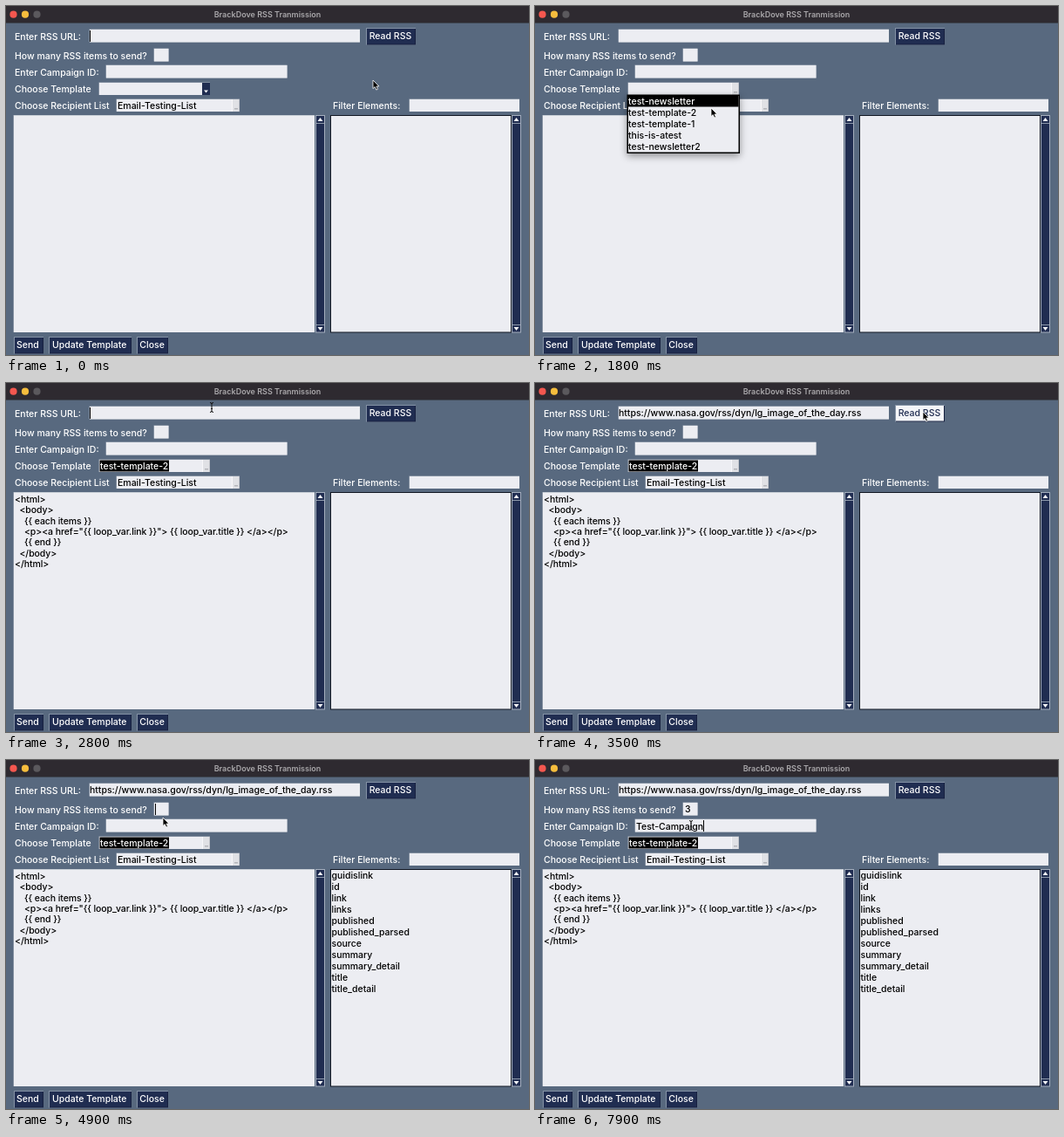
An HTML page for the animation above (8 s loop, 600x400 px).

```html
<!DOCTYPE html>
<html lang="en">
<head>
<meta charset="utf-8">
<title>RSS Tranmission</title>
<style>
  html, body { margin: 0; width: 100%; height: 100%; overflow: hidden; background: #58697f; }
  svg { display: block; width: 600px; height: 400px; }
  text { font: 500 10.5px Inter, Roboto, sans-serif; white-space: pre; fill: #000; }
  .light { fill: #fff; }
  .code { letter-spacing: -.08px; }
  .title { font-size: 9px; font-weight: 600; fill: #aaa8ab; text-anchor: middle; }
  .navy { fill: #202d51; }
  .shadow { filter: drop-shadow(0 3px 4px rgba(0, 0, 0, .4)); }
</style>
</head>
<body>
<svg id="stage" viewBox="0 0 600 400"></svg>
<script>
const LOOP = 8000, STEP = 100;
const NAVY = '#202d51', PALE = '#ecedf2';
const stage = document.getElementById('stage');

function add(tag, attrs, parent = stage) {
  const node = document.createElementNS('http://www.w3.org/2000/svg', tag);
  for (const key in attrs) node.setAttribute(key, attrs[key]);
  parent.appendChild(node);
  return node;
}
const group = (parent, cls = '') => add('g', { class: cls }, parent);
const rect = (x, y, width, height, fill, parent) => add('rect', { x, y, width, height, fill }, parent);
const path = (d, fill, parent) => add('path', { d, fill }, parent);
function label(x, y, string, cls = '', parent) {
  const node = add('text', { x, y, class: cls }, parent);
  node.textContent = string;
  return node;
}
function show(node, on) { node.style.display = on ? '' : 'none'; }

function field(x, y, w, h) {
  rect(x - .5, y - .5, w + .5, h + .5, '#a8b1be');
  rect(x, y, w, h, PALE);
}
function button(x, y, w, h, textX, string) {
  rect(x, y, w, h, '#8492a5');
  rect(x + 1, y + 1, w - 1, h - 1, '#172140');
  const face = rect(x + 1, y + 1, w - 2, h - 2, NAVY);
  const caption = label(textX, y + 13.3, string, 'light');
  return { face, caption };
}
function scrollbar(x) {
  rect(x, 125, 11, 249.5, '#a4aebd');
  rect(x + 1, 126, 9, 247.5, NAVY);
  rect(x + 1, 134, 9, 1, '#8d99ab');
  rect(x + 1, 365, 9, 1, '#8d99ab');
  path(`M${x + 2.5} 132h6l-3-4z M${x + 2.5} 368h6l-3 4z`, '#f2f3f6');
}
function paleArrow(x, y, parent) {
  rect(x, y, 9, 14, '#e0e1e5', parent);
  rect(x, y, 1, 14, '#f8f8fa', parent);
  rect(x + 8, y, 1, 14, '#c4c6cc', parent);
  rect(x + 3, y + 10, 4, 1.5, '#b4b5ba', parent);
}

// Window
rect(0, 0, 600, 400, '#58697f');
rect(0, 0, 600, 19.5, '#2e2a30');
rect(0, 19, 600, 1, '#3f4753');
[['#f4574f', 8.5], ['#f6bd3d', 22], ['#5b595d', 35.5]].forEach(([fill, cx]) =>
  add('circle', { cx, cy: 9.7, r: 4.1, fill }));
label(300, 13, 'BrackDove RSS Tranmission', 'title');

// Form
label(10, 38.5, 'Enter RSS URL:', 'light');
label(10, 60.5, 'How many RSS items to send?', 'light');
label(10, 80, 'Enter Campaign ID:', 'light');
label(10, 99, 'Choose Template', 'light');
label(10, 118.3, 'Choose Recipient List', 'light');
label(375, 118.3, 'Filter Elements:', 'light');
field(96, 27, 310, 14.5);
field(170, 49, 16.5, 14.5);
field(115, 68, 207.5, 14.5);
field(107, 88, 127, 14);
field(127, 107, 141, 14);
field(463, 107, 126, 14);
const navyArrow = group();
rect(225, 88, 9, 14, NAVY, navyArrow);
path('M227 96.5h5l-2.5 3z', '#f2f3f6', navyArrow);
const openedArrow = group();
paleArrow(225, 88, openedArrow);
paleArrow(259, 107);
label(128, 118, 'Email-Testing-List');
const read = button(413, 25, 57, 19.5, 416.7, 'Read RSS');
button(9, 379, 34, 19.5, 12, 'Send');
button(49, 379, 95, 19.5, 53, 'Update Template');
button(150, 379, 36, 19.5, 153.3, 'Close');

// Panels
field(9, 125.5, 345, 248.5);
rect(372, 125, 208, 249.5, '#111722');
rect(373, 126, 206, 247.5, PALE);
scrollbar(355);
scrollbar(580);

const chosen = group();
rect(107.5, 88.5, 79.5, 13, '#000', chosen);
label(108, 99, 'test-template-2', 'light', chosen);
[
  '<html>', '  <body>', '    {{ each items }}',
  '    <p><a href="{{ loop_var.link }}"> {{ loop_var.title }} </a></p>',
  '    {{ end }}', '  </body>', '</html>'
].forEach((line, i) => label(10, 136.8 + i * 12.35, line, 'code', chosen));

const elements = group();
['guidislink', 'id', 'link', 'links', 'published', 'published_parsed', 'source',
 'summary', 'summary_detail', 'title', 'title_detail']
  .forEach((name, i) => label(373.5, 136.2 + i * 13, name, '', elements));

// Template popup
const popup = group(stage, 'shadow');
rect(105.5, 101.5, 129.5, 67.5, '#000', popup);
rect(107, 103, 126.5, 64.5, PALE, popup);
const highlight = rect(107, 102.5, 126.5, 13, '#000', popup);
const options = ['test-newsletter', 'test-template-2', 'test-template-1', 'this-is-atest', 'test-newsletter2']
  .map((name, i) => label(107, 113 + i * 13, name, '', popup));

// Typed text, caret and pointer
const inputs = {
  url: { x: 96, y: 28, node: label(96, 38.3, '') },
  count: { x: 171, y: 50, node: label(172, 60.3, '') },
  campaign: { x: 116, y: 69, node: label(116, 79.5, '') }
};
const caret = rect(0, 0, 1, 13, '#000');
const arrow = add('path', {
  d: 'M0 0V9.6L2.2 7.6L3.8 11.1L5.5 10.3L4 7H7Z',
  fill: '#000', stroke: '#fff', 'stroke-width': .8
});
const beam = add('path', {
  d: 'M-2-5.5Q0-5.5 0-4Q0-5.5 2-5.5M0-4.5V4.5M-2 5.5Q0 5.5 0 4Q0 5.5 2 5.5M-1 1.5H1',
  fill: 'none', stroke: '#111', 'stroke-width': 1
});

const route = [
  [0, 421, 85], [100, 421, 85], [900, 230, 96], [1200, 230, 96], [1800, 202, 117],
  [2100, 197, 122], [2800, 236, 28], [2900, 236, 32], [3100, 237, 33], [3400, 445, 33],
  [3800, 445, 33], [4600, 178, 58], [4700, 178, 58], [4900, 180, 66],
  [5100, 180, 68], [5300, 179, 75], [LOOP, 179, 75]
];
const editable = [[96, 27, 406, 42], [170, 49, 187, 64], [115, 68, 323, 83], [9, 126, 354, 375]];
const keyTimes = [5800, 6000, 6100, 6300, 6400, 6600, 6700, 6800, 7000, 7100, 7200, 7300, 7400];
const caretSpans = [
  ['url', 0, 600], ['url', 900, 1100], ['url', 2800, 3400],
  ['count', 4700, 5300], ['campaign', 5600, 7600], ['campaign', 7900, LOOP]
];

function pointerAt(t) {
  const i = route.findIndex(p => p[0] > t);
  const [t0, x0, y0] = route[i - 1], [t1, x1, y1] = route[i];
  const k = (t - t0) / (t1 - t0), ease = k * k * (3 - 2 * k);
  return [x0 + (x1 - x0) * ease, y0 + (y1 - y0) * ease];
}

function draw(t) {
  const within = (from, to) => t >= from && t < to;
  const popupOpen = within(1100, 2100);
  show(navyArrow, t < 1000);
  show(openedArrow, t >= 1000);
  show(popup, popupOpen);
  const row = t < 1900 ? 0 : 1;
  highlight.setAttribute('y', 102.5 + row * 13);
  options.forEach((option, i) => option.setAttribute('class', i === row ? 'light' : ''));
  show(chosen, t >= 2100);
  show(elements, t >= 3900);

  const [x, y] = pointerAt(t);
  const hover = x >= 413 && x < 470 && y >= 25 && y < 45;
  read.face.setAttribute('fill', hover ? '#f4f5f8' : NAVY);
  read.caption.setAttribute('class', hover ? 'navy' : 'light');

  inputs.url.node.textContent = t >= 3000 ? 'https://www.nasa.gov/rss/dyn/lg_image_of_the_day.rss' : '';
  inputs.count.node.textContent = t >= 5100 ? '3' : '';
  inputs.campaign.node.textContent = 'Test-Campaign'.slice(0, keyTimes.filter(k => k <= t).length);

  const span = caretSpans.find(s => within(s[1], s[2]));
  show(caret, span);
  if (span) {
    const input = inputs[span[0]];
    const width = input.node.textContent ? input.node.getComputedTextLength() : 0;
    caret.setAttribute('x', Math.round(input.x + width));
    caret.setAttribute('y', input.y);
  }

  const overText = !popupOpen && editable.some(([l, top, r, b]) => x >= l && x < r && y >= top && y < b);
  show(arrow, !overText);
  show(beam, overText);
  (overText ? beam : arrow).setAttribute('transform', `translate(${x} ${y})`);
}

const start = performance.now();
function tick() {
  const t = (performance.now() - start) % LOOP;
  draw(Math.floor(t / STEP) * STEP);
  requestAnimationFrame(tick);
}
tick();
</script>
</body>
</html>
```
